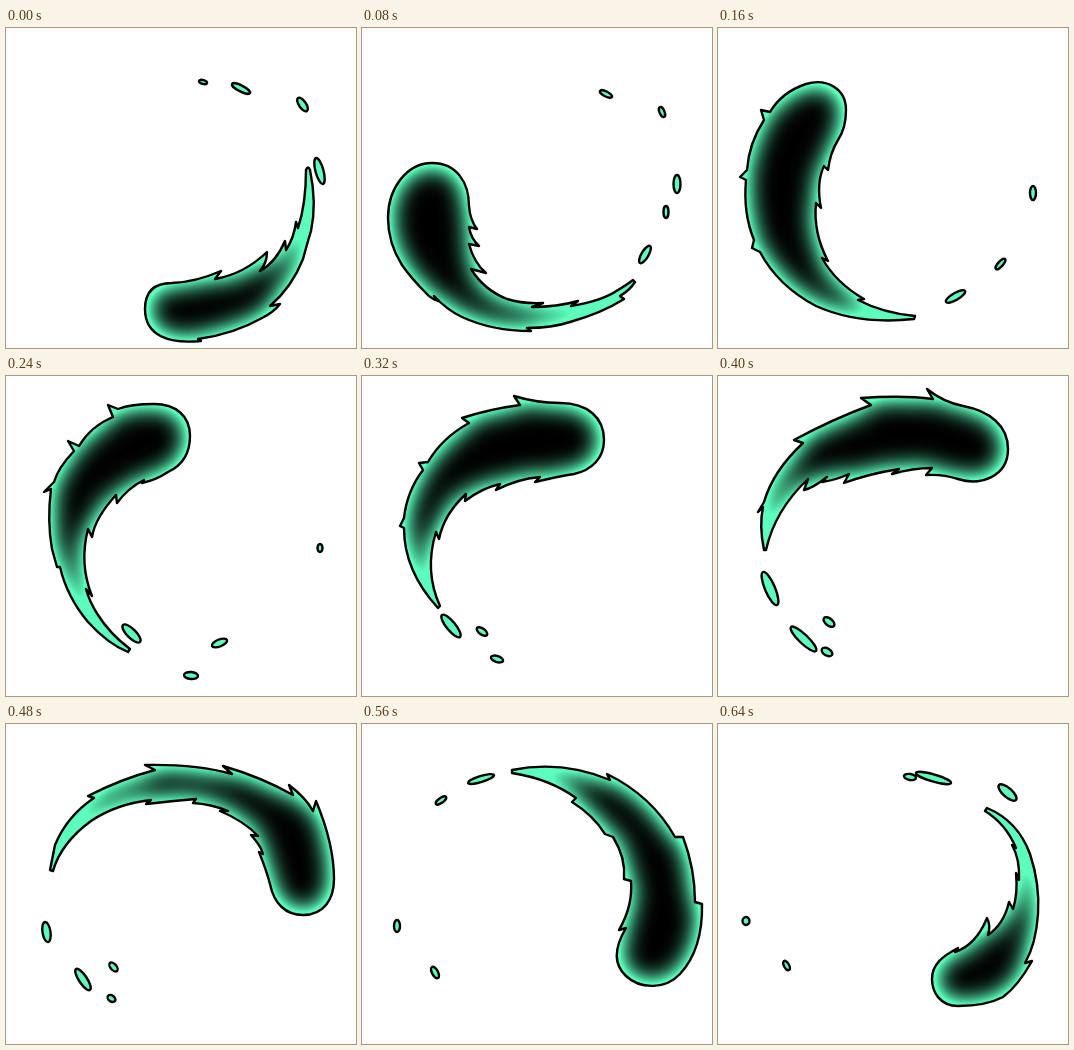
Animation of 350x320 px, one loop 0.72 s. Source, as an HTML page:

```html
<!DOCTYPE html>
<html lang="en">
<head>
<meta charset="utf-8">
<title>Circling flame</title>
<style>
html, body { margin: 0; width: 100%; height: 100%; overflow: hidden; background: #fff; }
svg { display: block; width: 100%; height: 100%; }
</style>
</head>
<body>
<svg viewBox="0 0 350 320">
  <filter id="glow" filterUnits="userSpaceOnUse" x="-60" y="-60" width="470" height="440" color-interpolation-filters="sRGB">
    <feComponentTransfer in="SourceAlpha"><feFuncA type="table" tableValues="1 0"/></feComponentTransfer>
    <feGaussianBlur stdDeviation="13"/>
    <feComponentTransfer result="rim"><feFuncA type="linear" slope="2"/></feComponentTransfer>
    <feFlood flood-color="#5cfdbd"/>
    <feComposite in2="rim" operator="in"/>
    <feComposite in2="SourceGraphic" operator="atop"/>
  </filter>
  <path id="fill" filter="url(#glow)"/>
  <path id="line" fill="none" stroke="#000" stroke-width="2.4" stroke-linejoin="round"/>
</svg>
<script>
const STEP = 80;

// An oval spark whose long axis runs from (x1, y1) to (x2, y2)
function spark(x1, y1, x2, y2, width) {
  const dx = x2 - x1, dy = y2 - y1;
  const arc = `A${Math.hypot(dx, dy) / 2} ${width / 2} ${Math.atan2(dy, dx) * 180 / Math.PI} 0 1 `;
  return `M${x1} ${y1}${arc}${x2} ${y2}${arc}${x1} ${y1}Z`;
}

const pose = (body, ...sparks) => body + sparks.map(s => spark(...s)).join('');

const poses = [
  pose(`M139 281C139 264 148 255 166 255Q190 254 215 243L209 251Q238 246 261 224Q261 235 254 243
    Q270 234 279 213L280 222Q288 210 290 194L292 200Q300 176 300 142Q302 137 304 142Q311 175 305 203
    Q301 216 297 231Q286 259 264 278L274 276Q268 284 256 290Q228 306 192 311L195 313
    C165 316 139 309 139 281Z`,
    [193, 53, 201, 55, 4], [226, 56, 244, 65, 6], [292, 70, 301, 83, 7], [310, 130, 317, 156, 8]),
  pose(`M26 190C26 160 45 135 70 135C95 135 107 155 107 178Q108 192 115 201L107 199Q109 211 117 218
    L107 216Q112 235 124 245L109 241Q122 262 145 271Q160 276 181 275L170 279Q195 279 216 273L209 278
    Q240 273 256 262Q266 256 271 252L273 254Q268 262 258 268L262 271Q240 285 208 294Q190 300 165 300
    L169 303Q130 303 100 289Q85 282 72 268L76 273Q68 270 64 265Q49 250 40 237Q26 215 26 190Z`,
    [238, 63, 250, 69, 5], [298, 79, 302, 89, 5], [315, 147, 315, 165, 7], [304, 178, 304, 190, 5],
    [278, 235, 288, 218, 7]),
  pose(`M128 82C128 60 108 50 88 56Q64 64 52 84L43 82L46 92Q31 115 29 142L22 149L28 152Q25 185 36 212
    L34 220L42 224Q60 258 98 278Q140 297 196 291L197 288Q165 285 140 272L146 271Q118 255 104 230
    L110 233Q95 205 98 175L103 180Q98 155 106 138L110 142Q112 125 120 112Q128 100 128 82Z`,
    [228, 274, 247, 263, 7], [278, 241, 287, 231, 5], [315, 158, 315, 172, 6]),
  pose(`M184 60C184 40 170 28 148 28Q125 28 112 33L102 29L107 41Q85 50 73 70L62 65L68 75Q52 92 48 106
    L38 116L45 113Q41 145 46 173L51 191L54 191Q61 221 82 246Q102 268 122 276L124 273
    Q104 258 92 239Q83 225 80 213L86 220Q73 188 82 153L86 161Q89 142 110 119L111 127Q122 112 138 104
    L136 107Q150 104 162 96C177 89 184 77 184 60Z`,
    [117, 249, 134, 266, 9], [206, 270, 221, 264, 7], [178, 299, 192, 300, 7], [314, 168, 314, 176, 5]),
  pose(`M242 64C242 42 226 27 198 27Q175 27 152 20L158 29Q128 33 100 42L107 47Q80 62 66 86L57 87
    L61 94Q45 115 42 142L38 150L42 152Q42 195 76 232L78 230Q62 195 74 156L77 163Q82 138 104 118
    L103 125Q120 112 138 108L134 114Q155 103 178 101L173 106Q198 100 212 98C230 94 242 82 242 64Z`,
    [80, 239, 98, 261, 9], [115, 252, 125, 259, 6], [129, 281, 141, 285, 6]),
  pose(`M290 73C290 50 272 35 245 30Q225 26 209 13L215 23Q185 19 143 22L153 29Q115 43 76 64L85 67
    Q55 95 46 126L40 136L45 131Q41 150 46 174L48 174Q57 134 90 103L86 114Q95 112 109 101L104 106
    Q118 104 131 98L126 107Q150 98 181 93L174 98Q195 92 214 92L208 99Q225 98 240 103
    C262 110 290 101 290 73Z`,
    [45, 196, 59, 229, 10], [106, 242, 116, 250, 7], [73, 251, 98, 275, 9], [104, 273, 114, 279, 7]),
  pose(`M328 155Q328 120 310 77L307 87Q300 74 283 61L287 71Q255 53 217 42L226 50Q190 40 139 41L149 46
    Q115 55 82 72L88 74Q61 92 49 121L44 146L47 147Q55 119 85 97Q110 80 145 76L140 80Q165 77 190 75
    L187 79Q205 80 222 87L214 87Q238 97 252 112L245 111Q255 122 257 130L253 128Q260 145 264 160
    C268 180 280 191 297 191C318 191 328 175 328 155Z`,
    [39, 198, 42, 218, 8], [70, 245, 84, 266, 8], [104, 239, 111, 247, 6], [102, 272, 109, 277, 6]),
  pose(`M150 46Q200 36 248 56L245 50Q290 72 313 113L321 113Q333 145 333 178L340 180Q341 225 318 250
    C304 265 279 266 264 252C249 238 255 219 264 204L257 206Q271 182 269 157L262 155Q264 134 251 113
    L243 110Q231 91 210 78L214 74Q188 55 150 49Z`,
    [106, 59, 132, 51, 6], [74, 80, 84, 73, 5], [35, 196, 35, 208, 6], [70, 243, 76, 254, 6]),
  pose(`M214 255C214 240 225 232 240 224L237 228Q258 221 269 194Q273 201 270 211Q286 200 291 178L295 185
    Q300 170 298 149L301 156Q302 135 294 121L298 124Q288 100 267 87L269 84Q300 97 312 130Q322 160 320 190
    Q318 220 307 239L314 237Q300 262 285 273Q268 282 240 282C222 282 214 268 214 255Z`,
    [186, 52, 198, 54, 6], [198, 49, 233, 59, 7], [281, 61, 298, 76, 9], [28, 193, 28, 201, 7],
    [66, 237, 71, 246, 5])
];

const paths = [document.getElementById('fill'), document.getElementById('line')];
const start = performance.now();

function draw() {
  const i = Math.floor((performance.now() - start) / STEP) % poses.length;
  paths.forEach(p => p.setAttribute('d', poses[i]));
  requestAnimationFrame(draw);
}
draw();
</script>
</body>
</html>
```
